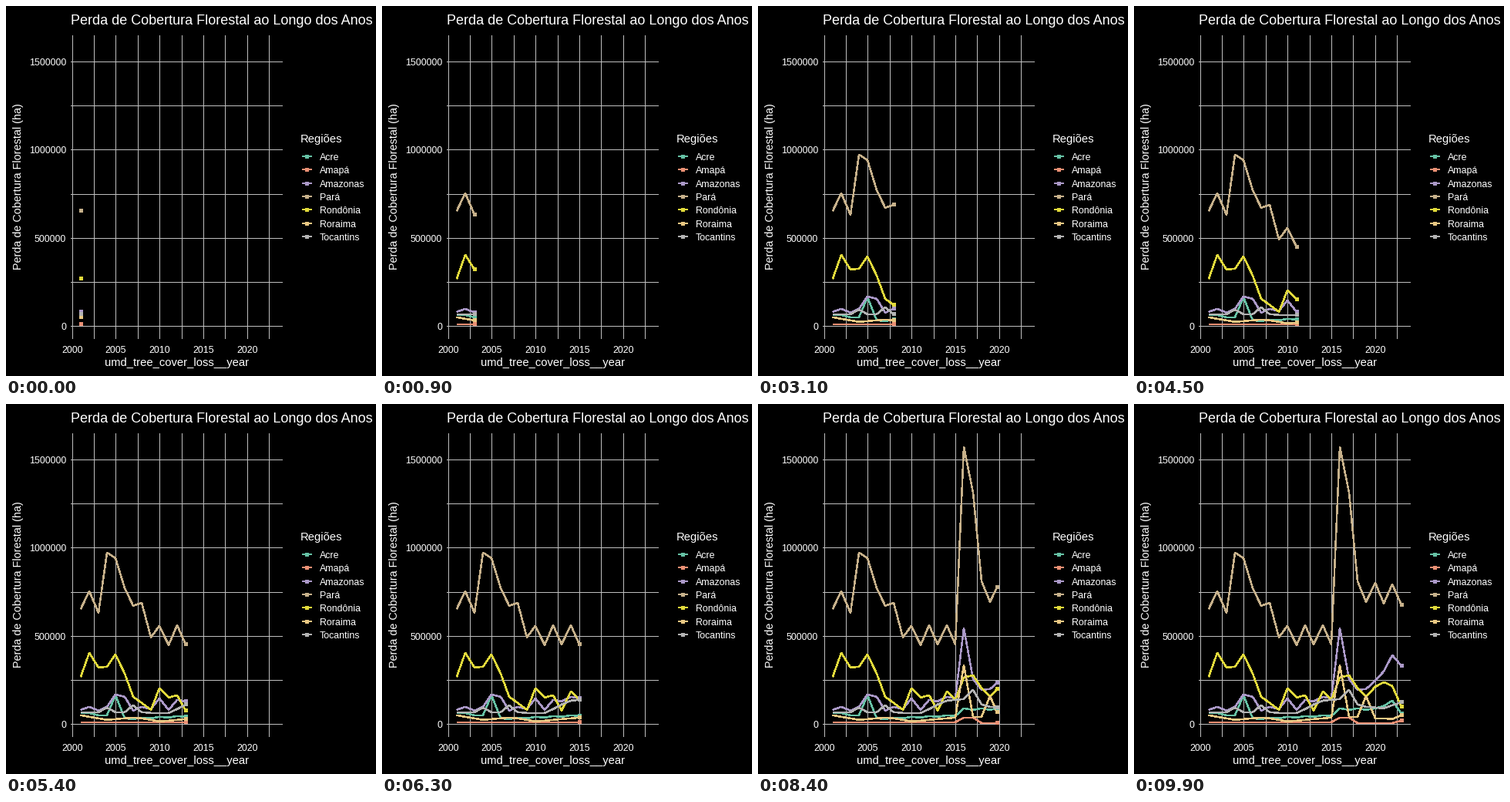
These frames come from a looping animation (480 by 480 pixels, 10 s). A matplotlib script:

```python
import matplotlib.pyplot as plt
import numpy as np
from matplotlib.animation import FuncAnimation
from matplotlib.patches import Circle

SIZE, FRAMES = 480, 100
PX = 0.75  # points per pixel at 96 dpi
GRID = "#BEBEBE"

plt.rcParams["font.family"] = "Liberation Sans"

YEARS = np.arange(1, 24)  # counted from 2000
KNOTS = np.ceil(4.5 * (YEARS - 1) - 0.5)  # frame at which each year is reached

# Thousands of hectares: (even/odd year swing, trend points, single-year jumps)
REGIONS = {
    "Acre": (4, {1: 70, 6: 34, 15: 52, 16: 88, 20: 90, 22: 132},
             {5: 130, 23: -66}),
    "Amapá": (0, {1: 14, 15: 14, 22: 8}, {16: 28, 17: 28, 23: 15}),
    "Amazonas": (10, {1: 92, 8: 90, 15: 160, 18: 188, 20: 238, 22: 384},
                 {5: 92, 6: 57, 10: 28, 11: -24, 16: 370, 17: 88, 23: -40}),
    "Pará": (55, {1: 710, 3: 690, 7: 727, 9: 550, 10: 505, 15: 512, 18: 757, 23: 735},
             {4: 221, 5: 290, 16: 927, 17: 694}),
    "Rondônia": (25, {1: 295, 3: 350, 5: 345, 8: 100, 14: 162, 20: 190, 23: 195},
                 {2: 62, 4: -45, 5: 80, 10: 60, 11: 50, 13: -45,
                  16: 72, 17: 130, 21: 75, 23: -70}),
    "Roraima": (0, {1: 54, 4: 26, 7: 42, 10: 20, 17: 46, 22: 32},
                {16: 296, 19: 122, 23: 21}),
    "Tocantins": (0, {1: 72, 6: 72, 11: 65, 14: 138, 16: 147, 19: 100, 21: 94, 23: 127},
                  {4: 25, 7: 39, 17: 68}),
}


def yearly_loss(swing, trend, jumps):
    base = np.interp(YEARS, list(trend), list(trend.values()))
    jump = np.array([jumps.get(y, 0) for y in YEARS])
    return base + jump + swing * (-1.0) ** YEARS


def palette(n):
    base = np.array(plt.get_cmap("Set2").colors)
    at = np.linspace(0, 7, n)
    return np.column_stack([np.interp(at, np.arange(8), c) for c in base.T])


def to_x(year):
    return np.floor(86.15 + 11.355 * np.asarray(year))


def to_y(loss):
    return np.floor(415.7 - 0.2288 * np.asarray(loss))


fig = plt.figure(figsize=(5, 5), dpi=96, facecolor="black")
ax = fig.add_axes([0, 0, 1, 1])
ax.set_xlim(0, SIZE)
ax.set_ylim(SIZE, 0)
ax.axis("off")


def label(x, y, text, size, ha="left", **kw):
    ax.text(x, y, text, size=size * PX, color="white", ha=ha, va="baseline", **kw)


def line(xs, ys, color, width=1.5, z=2):
    return ax.plot(xs, ys, color=color, lw=width * PX, zorder=z,
                   antialiased=False, snap=False,
                   solid_capstyle="butt", solid_joinstyle="round")[0]


def dot(x, y, color):
    return ax.add_patch(Circle((x + 0.5, y + 0.5), 2.5, fc=color, lw=0,
                               zorder=3, antialiased=False))


for year in np.arange(0, 23, 2.5):
    x = to_x(year)
    line([x + 0.5] * 2, [38, 432], GRID, 1, 1)
    if year % 5 == 0:
        label(x + 0.5, 450, f"{2000 + year:.0f}", 12.4, "center")

for loss in range(0, 1501, 250):
    y = to_y(loss)
    line([84, 359], [y + 0.5] * 2, GRID, 1, 1)
    if loss % 500 == 0:
        label(78, y + 5, str(loss * 1000), 12.4, "right")

label(84, 24, "Perda de Cobertura Florestal ao Longo dos Anos", 18)
label(221.5, 467, "umd_tree_cover_loss__year", 14.7, "center")
label(20, 234, "Perda de Cobertura Florestal (ha)", 14.4, "center",
      rotation=90, rotation_mode="anchor")
label(382, 177, "Regiões", 14.7)

series = []
for i, (name, color) in enumerate(zip(REGIONS, palette(len(REGIONS)))):
    row = np.floor(195.6 + 17.28 * i)
    line([384, 397], [row, row], color)
    dot(390, row, color)
    label(406.5, row + 5, name, 12.4)
    series.append((yearly_loss(*REGIONS[name]), line([], [], color), dot(0, 0, color)))


def draw(frame):
    now = np.interp(frame, KNOTS, YEARS)
    t = np.append(YEARS[YEARS < now], now)
    xs = to_x(t)
    artists = []
    for values, trail, head in series:
        ys = to_y(np.interp(t, YEARS, values))
        trail.set_data(xs, ys + 0.8)
        head.center = xs[-1] + 0.5, ys[-1] + 0.5
        artists += [trail, head]
    return artists


anim = FuncAnimation(fig, draw, frames=FRAMES, interval=100, repeat=True)
plt.show()
```
